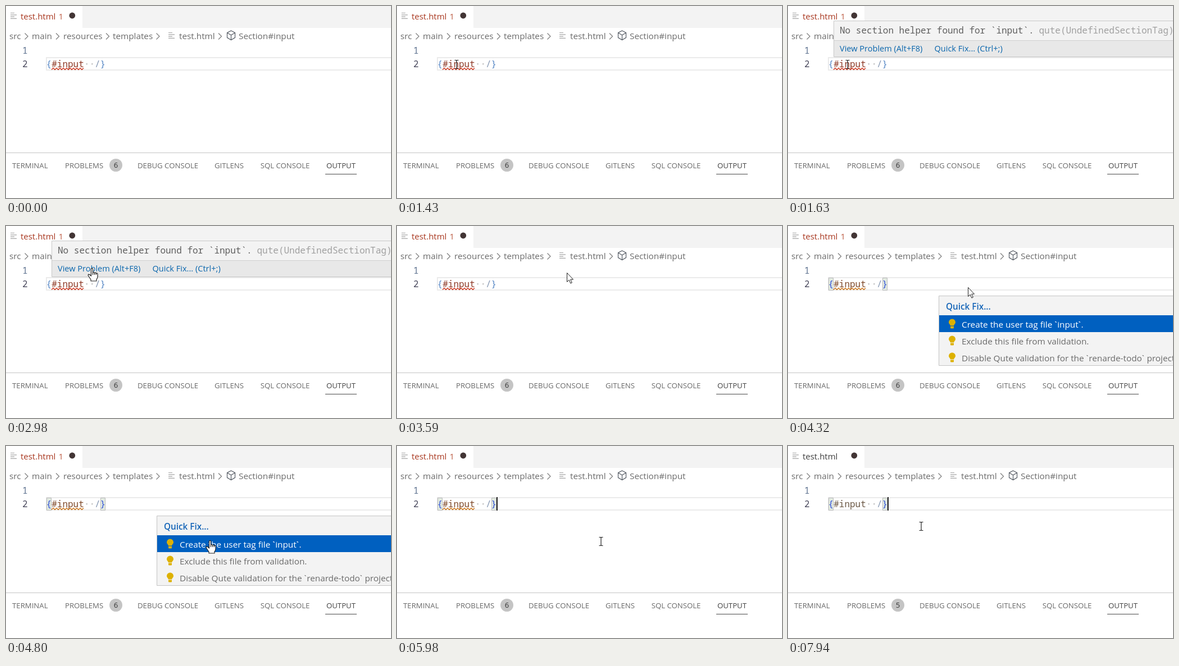
An HTML page for the animation above (8000 ms loop, 685 by 342 pixels).

```html
<!DOCTYPE html>
<html lang="en">
<head>
<meta charset="utf-8">
<title>Editor quick fix</title>
<style>
  html, body { margin: 0; width: 100%; height: 100%; overflow: hidden; background: #fff; }
  svg { display: block; width: 685px; height: 342px; }
  text { font: 15.3px "Open Sans", "Noto Sans", sans-serif; fill: #6a6a6a; white-space: pre; }
  .code text, text.code { font: 16px "Noto Sans Mono", "DejaVu Sans Mono", monospace; }
  .tabs text { font-size: 13.2px; }
  .links text { font-size: 14.55px; fill: #0a66ad; }
  .tick { font-family: Roboto, sans-serif; }
  .line { fill: none; stroke-width: 1.2; }
</style>
</head>
<body>
<svg viewBox="0 0 685 342">
  <defs>
    <path id="lines" class="line" stroke="#a5a5a5" d="M0 .5h7M0 3.8h11M0 7.1h7M0 10.4h11"/>
    <path id="chevron" class="line" stroke="#7c7c7c" d="M0 0l5.5 5.5L0 11"/>
    <g id="bulb" fill="#ddb100">
      <path d="M-6-2a6 6 0 0 1 12 0c0 3-2.6 3.6-2.8 6h-6.4c-.2-2.4-2.8-3-2.8-6z"/>
      <path d="M-3 5h6v3q0 1-1 1h-4q-1 0-1-1z"/>
    </g>
  </defs>

  <!-- Editor tab and breadcrumbs -->
  <path fill="#f3f3f3" d="M136 0h549v39H136z"/>
  <use href="#lines" x="8" y="12"/>
  <text id="title" x="26" y="23.5" style="font-size:15px">test.html</text>
  <text id="count" x="93.5" y="23.5" style="font-size:15px;fill:#bb5a40">1</text>
  <circle cx="117.8" cy="17" r="5.4" fill="#423535"/>
  <g id="crumbs">
    <text x="6" y="59">src</text>
    <text x="46" y="59">main</text>
    <text x="102" y="59">resources</text>
    <text x="190" y="59">templates</text>
    <text x="308" y="59">test.html</text>
    <text x="414" y="59">Section#input</text>
    <use href="#chevron" x="33.5" y="48.5"/>
    <use href="#chevron" x="89" y="48.5"/>
    <use href="#chevron" x="178" y="48.5"/>
    <use href="#chevron" x="267.5" y="48.5"/>
    <use href="#chevron" x="378" y="48.5"/>
    <use href="#lines" x="289" y="47"/>
    <path class="line" stroke="#555b64" d="M400.5 44l7 3.7v8.6l-7 4.2-7-4.2v-8.6zM393.5 47.7l7 4 7-4M400.5 51.7v8.8"/>
  </g>

  <!-- Code -->
  <g class="code">
    <path fill="none" stroke="#ebebeb" stroke-width="2" d="M685 92H72v22h613"/>
    <text x="29" y="84.5" style="fill:#5f7390">1</text>
    <text x="29" y="108.5" style="fill:#48485c">2</text>
    <g id="brackets" fill="#e2ebe2" stroke="#b9b9b9">
      <path d="M72.5 92.5h8v22h-8zM168.5 92.5h8v22h-8z"/>
    </g>
    <text class="brace" x="71.6" y="108.5">{</text>
    <text id="tag" x="81.2" y="108.5">#input</text>
    <path fill="#c6c6c6" d="M142.5 102h2.4v2.4h-2.4zM152.1 102h2.4v2.4h-2.4z"/>
    <text x="158" y="108.5" style="fill:#8496b2">/</text>
    <text class="brace" x="167.6" y="108.5">}</text>
    <path id="squiggle" class="line" style="stroke-width:1.4"/>
    <path id="caret" fill="#222" d="M177 91h2v24h-2z"/>
  </g>

  <!-- Panel -->
  <path fill="#c4c4c4" d="M0 261h685v1H0z"/>
  <g class="tabs">
    <text x="11" y="289">TERMINAL</text>
    <text x="105" y="289">PROBLEMS</text>
    <circle cx="195.5" cy="283.5" r="11.5" fill="#c4c4c4"/>
    <text id="badge" x="195.5" y="288.3" text-anchor="middle" style="fill:#333">6</text>
    <text x="234" y="289">DEBUG CONSOLE</text>
    <text x="371" y="289">GITLENS</text>
    <text x="452.7" y="289">SQL CONSOLE</text>
    <text x="570" y="289" style="fill:#424242">OUTPUT</text>
    <path fill="#4a4a4a" d="M568 299h56v1h-56z"/>
  </g>

  <!-- Problem hover -->
  <g id="hover">
    <path fill="#f3f3f3" stroke="#c8c8c8" d="M81.5 26.5h610v64h-610z"/>
    <path fill="#e8e8e8" d="M82 61h603v29H82z"/>
    <path fill="#d0d0d0" d="M82 61h603v1H82z"/>
    <text class="code" x="92" y="49" style="fill:#5f5f5f">No section helper found for `input`.</text>
    <text class="code" x="446.5" y="49" style="fill:#a0a0a0">qute(UndefinedSectionTag)</text>
    <g class="links">
      <text x="92" y="81">View Problem (Alt+F8)</text>
      <text x="260.5" y="81">Quick Fix... (Ctrl+;)</text>
    </g>
  </g>

  <!-- Quick fix menu -->
  <g id="menu">
    <path fill="#f3f3f3" stroke="#c4c4c4" d="M268.5 124.5h430v124h-430z"/>
    <path fill="#0060c0" d="M269 159h416v30H269z"/>
    <text x="281" y="149" style="font-weight:600;fill:#1565b8">Quick Fix...</text>
    <use href="#bulb" x="292" y="173.5"/>
    <use href="#bulb" x="292" y="203.5"/>
    <use href="#bulb" x="292" y="233.5"/>
    <text x="309" y="181" style="font-weight:500;fill:#fff">Create the user tag file <tspan class="tick">`</tspan>input<tspan class="tick">`</tspan>.</text>
    <text x="309" y="211">Exclude this file from validation.</text>
    <text x="309" y="241">Disable Qute validation for the <tspan class="tick">`</tspan>renarde-todo<tspan class="tick">`</tspan> project</text>
  </g>

  <!-- Mouse pointers, each with its hotspot near 0,0 -->
  <g id="pointer">
    <path id="beam" class="line" stroke="#222" d="M-3.5-7.5h2.5l1 1 1-1h2.5M-3.5 7.5h2.5l1-1 1 1h2.5M0-6.5v13"/>
    <path id="arrow" fill="#fff" stroke="#222" stroke-linejoin="round" d="M-.5-.5v16l3.7-3.4 2.6 6 2.5-1.1-2.6-5.8h4.8z"/>
    <path id="hand" fill="#fff" stroke="#222" stroke-width="1.2" stroke-linejoin="round"
      transform="translate(0 -2)"
      d="M-1.5 14V2q0-1.6 1.5-1.6T1.5 2v6q1.6-1 3 .4 1.6-.8 2.8.6 2.7-.3 2.7 2v4q0 3-2 5v3H-2v-2.5l-4.6-7q-.8-2.2 1-2.4 1.6 0 4.1 3zM1.5 8v4M4.5 8.6V12M7.3 9.2V12"/>
  </g>
</svg>
<script>
const LOOP = 8000;
const $ = id => document.getElementById(id);
const show = (id, on) => $(id).style.display = on ? '' : 'none';

let wave = 'M81 113.5';
for (let x = 84; x <= 139; x += 3) wave += `L${x} ${x % 2 ? 113.5 : 110.5}`;
$('squiggle').setAttribute('d', wave);

// Pointer moves: start, end, visible steps, from, to, optional control point
const moves = [
  [130, 270, 3, [480, 298], [254, 201]],
  [540, 1290, 12, [254, 201], [106, 109]],
  [1360, 1430, 2, [106, 109], [106, 104]],
  [2980, 2980, 1, [106, 104], [153, 77]],
  [3047, 3450, 7, [153, 77], [303, 84], [220, 62]],
  [4120, 4800, 10, [303, 84], [363, 170]],
  [7180, 7670, 7, [363, 170], [239, 145]],
  [7940, 7940, 1, [239, 145], [237, 143]],
];

function pointerAt(t) {
  const move = moves.findLast(m => t >= m[0]);
  if (!move) return null;
  const [start, end, steps, from, to, via] = move;
  const step = steps > 1 ? Math.floor((t - start) / (end - start) * (steps - 1) + 0.001) + 1 : 1;
  const s = Math.min(1, step / steps);
  return from.map((a, i) => {
    const mid = via ? via[i] : (a + to[i]) / 2;
    return a * (1 - s) ** 2 + 2 * mid * s * (1 - s) + to[i] * s * s;
  });
}

function pointerKind(t, [x, y]) {
  if (t < 2980 || t >= 5980) return 'beam';
  if (t < 3590) return x > 241 && x < 260 ? 'arrow' : 'hand';
  return y > 159 ? 'hand' : 'arrow';
}

function draw(t) {
  const focused = t >= 3650, fixed = t >= 6850;
  show('hover', t >= 1570 && t < 3590);
  $('hover').style.opacity = t < 1630 ? 0.5 : 1;
  show('menu', t >= 3720 && t < 5980);
  show('brackets', focused);
  show('caret', t >= 5980 && (t - 5980) % 980 < 460);
  show('squiggle', !fixed);
  show('count', !fixed);
  $('squiggle').style.stroke = focused ? '#cc761c' : '#cf3a22';
  $('title').style.fill = fixed ? '#3f3f3f' : '#a8371f';
  $('tag').style.fill = fixed ? '#6b5845' : focused ? '#804a2a' : '#8f3b28';
  $('badge').textContent = fixed ? 5 : 6;
  for (const brace of document.querySelectorAll('.brace'))
    brace.style.fill = focused ? '#2c4cd4' : '#5385c4';

  const spot = pointerAt(t);
  show('pointer', spot);
  if (!spot) return;
  const kind = pointerKind(t, spot);
  for (const id of ['beam', 'arrow', 'hand']) show(id, id === kind);
  $('pointer').setAttribute('transform', `translate(${spot.map(Math.round)})`);
}

const origin = performance.now();
function tick() {
  draw((performance.now() - origin) % LOOP);
  requestAnimationFrame(tick);
}
tick();
</script>
</body>
</html>
```
